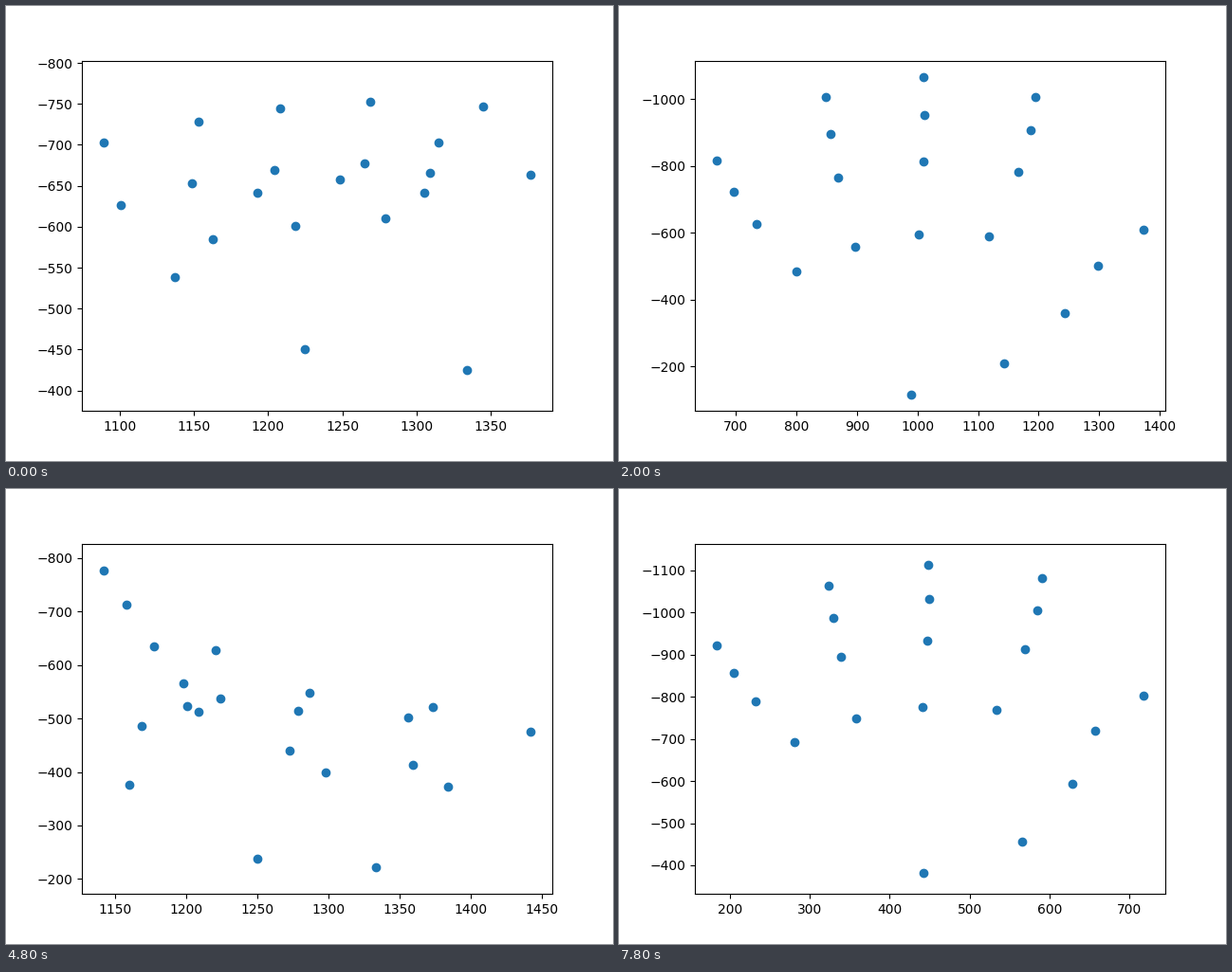
These frames come from a looping animation (640 px wide and 480 px high, 8000 ms). A matplotlib script:

```python
import numpy as np
import matplotlib.pyplot as plt
from matplotlib.animation import FuncAnimation

STEP_MS = 200
FRAMES = 40
Y_PAD = 50
X_MARGIN = 0.05

# positions of the four fingers across the hand, little finger first
KNUCKLES = np.array([0, 0.305, 0.637, 1])
TIPS = np.array([0, 0.345, 0.65, 1])
FIST = np.array([0, 0.37, 0.7, 1])


def arc(ends, ts, height):
    """Points along a shallow parabola between two ends."""
    a, b = np.array(ends, float)
    pts = a + (b - a) * ts[:, None]
    pts[:, 1] += 4 * height * ts * (1 - ts)
    return pts


def width(ends):
    return abs(ends[1][0] - ends[0][0])


def straight(base, tip, t=0.5):
    """Four joints, bowed away from the middle of the hand at 0 <= t <= 1."""
    reach = 0.04 * min(1, 3 * t)
    along = np.array([0, 0.425 + reach, 0.718 + reach, 1])
    bow = np.array([0, 1, 0.85, 0]) * 0.03 * (2 * t - 1)
    span = np.subtract(tip, base)
    pts = base + along[:, None] * span
    pts[:, 0] += bow * span[1]
    return pts


def folded(base, *bones):
    return np.cumsum([base, *bones], axis=0)


def hand(wrist, thumb, fingers):
    return np.vstack([[wrist], thumb, *fingers]) * (1, -1)


def open_hand(wrist, thumb, knuckles, tips, crown):
    bases = arc(knuckles, KNUCKLES, 0.155 * width(knuckles))
    ends = arc(tips, TIPS, crown)
    fingers = [straight(*f) for f in zip(bases, ends, KNUCKLES)]
    return hand(wrist, thumb, fingers)


def fist_bases(knuckles):
    return arc(knuckles, FIST, 0.06 * width(knuckles))


def closed_fist():
    little, *rest = fist_bases([(1377, 664), (1193, 641)])
    fingers = [folded(little, (-32, 83), (-30, -44), (-10, -62))]
    fingers += [folded(b, (-40, 87), (-4, -75), (14, -68)) for b in rest]
    thumb = [(1225, 450), (1137, 538), (1101, 626), (1089, 703)]
    return hand((1334, 425), thumb, fingers)


def pointing_hand():
    *outer, middle, index = fist_bases([(1442, 476), (1209, 513)])
    fingers = [folded(b, (-69, 45), (-14, -108), (25, -40)) for b in outer]
    fingers += [folded(middle, (-58, 115), (-20, -105), (23, 14)),
                straight(index, (1142, 777))]
    thumb = [(1250, 238), (1160, 376), (1169, 486), (1198, 566)]
    return hand((1333, 222), thumb, fingers)


spread = open_hand(
    wrist=(1188, 103),
    thumb=[(1332, 187), (1434, 332), (1504, 466), (1583, 566)],
    knuckles=[(1010, 460), (1315, 557)],
    tips=[(886, 792), (1400, 967)], crown=137)

shifted = open_hand(
    wrist=(791, 130),
    thumb=[(954, 229), (1051, 385), (1093, 535), (1165, 651)],
    knuckles=[(589, 509), (921, 619)],
    tips=[(449, 842), (988, 1047)], crown=137)

thumb_in = open_hand(
    wrist=(507, 144),
    thumb=[(615, 241), (675, 379), (665, 493), (608, 575)],
    knuckles=[(320, 461), (584, 572)],
    tips=[(170, 738), (599, 928)], crown=106)

palm = open_hand(
    wrist=(484, 340),
    thumb=[(616, 406), (697, 536), (757, 646), (830, 712)],
    knuckles=[(333, 650), (590, 720)],
    tips=[(233, 879), (676, 1013)], crown=96)

raised = open_hand(
    wrist=(442, 382),
    thumb=[(566, 456), (629, 593), (657, 719), (718, 802)],
    knuckles=[(281, 692), (533, 768)],
    tips=[(183, 921), (591, 1081)], crown=97)


def drift(t):
    return t


def snap(t):
    """Linger at both ends and swap quickly in the middle."""
    return t**4 / (t**4 + (1 - t)**4)


def snap_with_pause(t):
    """Snap in six steps, the third of them held."""
    n = round(t * 6)
    return snap((n - (n > 2)) / 5)


# start frame, pose, easing towards the next pose
KEYS = [
    (0, closed_fist(), snap),
    (6, spread, drift),
    (14, shifted, drift),
    (18, thumb_in, snap_with_pause),
    (24, pointing_hand(), snap),
    (29, palm, drift),
    (39, raised, drift),
]


def points_at(frame):
    for (a, start, ease), (b, end, _) in zip(KEYS, KEYS[1:]):
        if frame <= b:
            return start + (end - start) * ease((frame - a) / (b - a))


fig, ax = plt.subplots(figsize=(6.4, 4.8), dpi=100)
dots = ax.scatter(*points_at(0).T)


def update(frame):
    pts = points_at(frame)
    (x0, y0), (x1, y1) = pts.min(axis=0), pts.max(axis=0)
    pad = X_MARGIN * (x1 - x0)
    dots.set_offsets(pts)
    ax.set_xlim(x0 - pad, x1 + pad)
    ax.set_ylim(y1 + Y_PAD, y0 - Y_PAD)
    return dots,


anim = FuncAnimation(fig, update, frames=FRAMES, interval=STEP_MS,
                     repeat=True, repeat_delay=0, blit=False)
plt.show()
```
